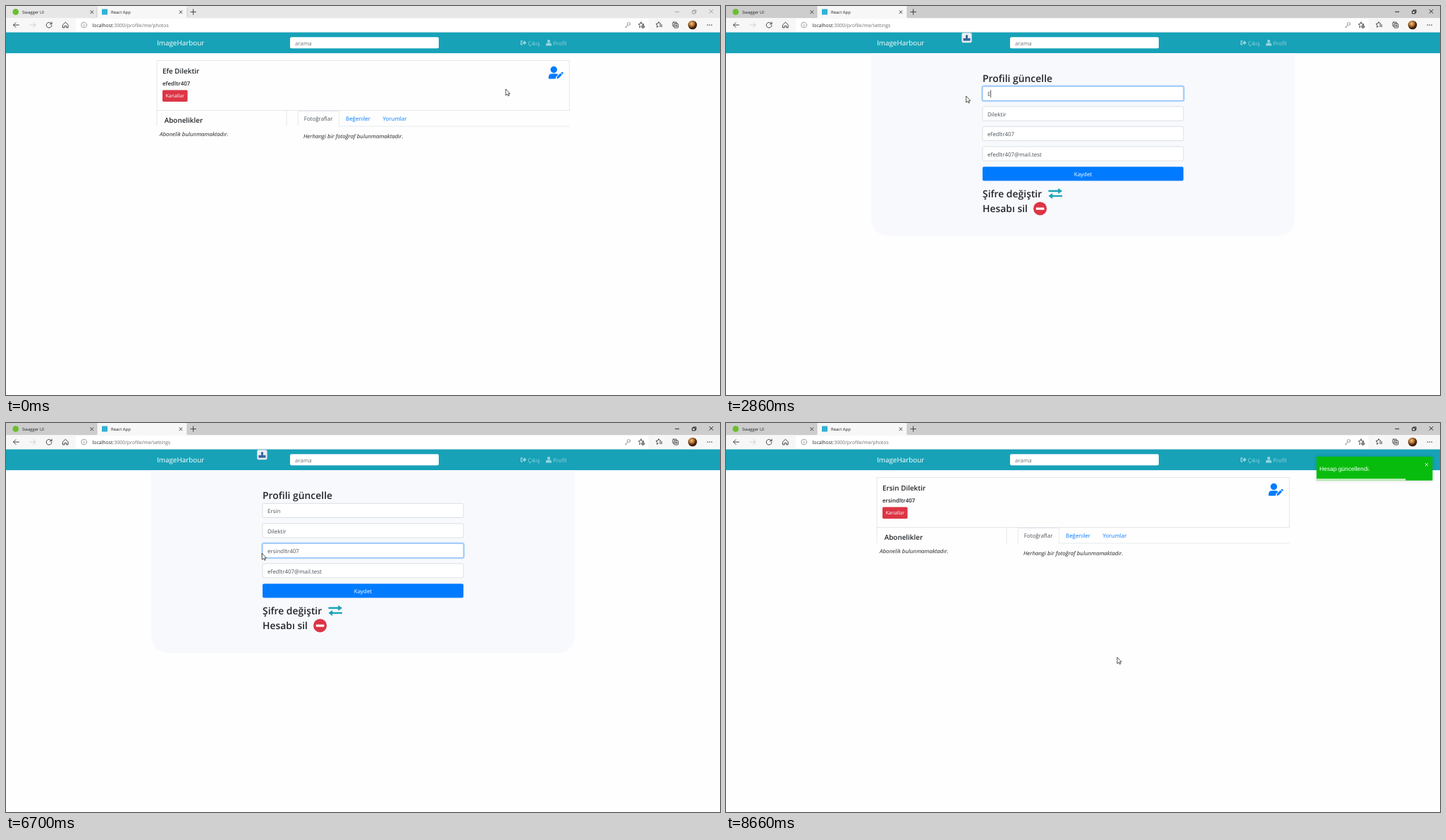
Recreate the animation shown at these times as an HTML page. Size 1013x553 px, loop 8.7 s.

```html
<!DOCTYPE html>
<html lang="tr">
<head>
<meta charset="utf-8">
<title>Profile update</title>
<style>
  html, body { margin: 0; width: 100%; height: 100%; overflow: hidden; background: #fefefe; }
  svg { display: block; width: 100%; height: 100%; }
  text { font: 7.93px "Open Sans", "Noto Sans", sans-serif; fill: #212529; text-rendering: geometricPrecision; white-space: pre; }
  .tiny { font-size: 5.95px; }
  .small { font-size: 6.95px; }
  .title { font-size: 9.9px; font-weight: 600; }
  .head { font-size: 13.9px; font-weight: 600; }
  .semi { font-weight: 600; }
  .it { font-style: italic; }
  .mid { text-anchor: middle; }
  .white { fill: #fff; }
  .blue { fill: #007bff; }
  .grey { fill: #495057; }
  .pale { fill: #fff; opacity: .55; }
  .line { fill: none; stroke: #dee2e6; stroke-width: .8; }
  .ico { fill: none; stroke: #333; stroke-width: .9; stroke-linecap: round; stroke-linejoin: round; }
  .cur { fill: #fff; stroke: #111; stroke-width: .7; stroke-linejoin: round; }
</style>
</head>
<body>
<svg viewBox="0 0 1013 553" preserveAspectRatio="none">
  <defs>
    <radialGradient id="photo" cx=".4" cy=".35">
      <stop offset="0" stop-color="#f3c58c"/><stop offset=".55" stop-color="#b8702c"/><stop offset="1" stop-color="#40200f"/>
    </radialGradient>
    <g id="person"><circle cx="4" cy="2.1" r="2.1"/><path d="M0 8.4V7q0-2.4 2.4-2.4h3.2Q8 4.6 8 7v1.4z"/></g>
  </defs>
  <rect width="1013" height="553" fill="#fefefe"/>

  <!-- browser window -->
  <rect id="strip" width="1013" height="17.2"/>
  <path d="M129 18V2q0-2 2-2h124q2 0 2 2v16z" fill="#f7f7f7"/>
  <path d="M129 2v14M257 2v14" stroke="#b9b9b9" stroke-width=".7"/>
  <rect y="17" width="1013" height="20.6" fill="#f7f7f7"/>
  <rect x="99" y="18.3" width="812.5" height="17.6" rx="2" fill="#fff"/>
  <circle cx="13.7" cy="8.4" r="4.3" fill="#6bbf2a"/>
  <rect x="136" y="4.4" width="8" height="8" fill="#31b3d4"/>
  <text class="tiny" x="23" y="10.7">Swagger UI</text>
  <text class="tiny" x="149" y="10.7">React App</text>
  <g class="ico">
    <path d="M119.8 6.6l4 4m0-4l-4 4M246 6.6l4 4m0-4l-4 4M262 8.4h7.4m-3.7-3.7v7.4"/>
    <path d="M18.5 27h-8m3.4-3.4L10.500 27l3.400 3.400"/>
    <path d="M34 27h8m-3.4-3.400L42 27l-3.400 3.400" stroke="#c9c9c9"/>
    <path d="M64.500 25.200a3.900 3.900 0 1 0 .500 2.300M65 23v2.700h-2.700"/>
    <path d="M80.700 26.600l3.700-3.400 3.700 3.400v4.200h-2.400v-2.600h-2.600v2.600h-2.400z"/>
    <g stroke="#777" stroke-width=".7">
      <circle cx="110.600" cy="27" r="3.900"/><path d="M110.600 26.500v2.600m0-4.200v.100"/>
      <circle cx="883.500" cy="25.500" r="2.100"/><path d="M882 27l-3.400 3.400h1.500v-1.200"/>
    </g>
    <path d="M901 23l1.200 2.500 2.800.400-1.600 1.500M899.800 30l-1 .600.500-2.800-2-2 2.600-.400L901 23"/>
    <circle cx="903.600" cy="29.400" r="2"/><path d="M902.700 29.400h1.800m-.900-.900v1.800" stroke-width=".6"/>
    <path d="M929 25l-1.700-.200L926 22.500l-1.300 2.500-2.700.400 2 1.900-.500 2.900 1.800-1M927.500 27h3.300m-3.300 2h3.300"/>
    <rect x="946" y="23" width="5.600" height="6" rx="1"/><rect x="948" y="25" width="5.700" height="6" rx="1" fill="#f7f7f7"/><path d="M949.500 28h2.800m-1.400-1.400v2.800"/>
  </g>
  <circle cx="974" cy="27" r="6.300" fill="url(#photo)"/>
  <g fill="#333"><circle cx="995.400" cy="27" r=".8"/><circle cx="998.300" cy="27" r=".8"/><circle cx="1001.200" cy="27" r=".8"/></g>
  <path id="controls" class="ico" stroke-width=".7" d="M949.700 8.300h5M974 7h3.800v3.800H974zM975.200 7V5.800h3.800v3.800h-1.200M998 5.200l5 5m0-5l-5 5"/>
  <text class="small" x="122.500" y="29.900">localhost<tspan fill="#6d6d6d">:3000/profile/me/</tspan><tspan id="route" fill="#6d6d6d"></tspan></text>

  <!-- site header -->
  <rect y="37.500" width="1013" height="29.600" fill="#17a2b8"/>
  <text class="white" x="214" y="56.300" style="font-size:9.900px">ImageHarbour</text>
  <rect x="403" y="44.300" width="211" height="16" rx="2" fill="#fff"/>
  <text x="410" y="55.700" style="fill:#6c757d">arama</text>
  <g class="pale">
    <path d="M733 49h-1.800q-1.200 0-1.200 1.200v4q0 1.200 1.200 1.200h1.800v-1.300h-1.600v-3.800h1.600zM733 51h2v-2.200l3.400 3.400-3.400 3.400v-2.200h-2z"/>
    <use href="#person" x="766" y="48"/>
  </g>
  <text class="pale" x="740.600" y="55.500">Çıkış</text>
  <text class="pale" x="776" y="55.500">Profil</text>

  <g id="profile">
    <rect class="line" x="214" y="77.400" width="585.300" height="71.200"/>
    <text class="title" id="fullName" x="222" y="96.400"></text>
    <text class="semi" id="userName" x="222" y="113.400"></text>
    <rect x="222" y="119.500" width="35.600" height="16.400" rx="1.700" fill="#dc3545"/>
    <text class="small white mid" x="239.800" y="130.400">Kanallar</text>
    <g class="blue">
      <circle cx="777.200" cy="90.500" r="4.700"/>
      <path d="M769.800 103.500v-2.300q0-5 5-5h5q2.300 0 3.700 1.300l-3.300 3.200-.500 2.800zM781.200 103.300l.500-2.700 5-5 2.200 2.200-5 5zM787.300 94.900l.9-.9q.7-.6 1.300 0l1 1q.6.600 0 1.200l-.9.900z"/>
    </g>
    <path class="line" d="M214 148.500V171M398.200 148.500V171M414.300 171v-20q0-1.700 1.700-1.700h55q1.700 0 1.700 1.700v20H799.500"/>
    <text class="title" x="224.700" y="165.600">Abonelikler</text>
    <text class="it" x="218" y="184.700">Abonelik bulunmamaktadır.</text>
    <text class="grey" x="422.800" y="163">Fotoğraflar</text>
    <text class="blue" x="482" y="163">Beğeniler</text>
    <text class="blue" x="534.500" y="163">Yorumlar</text>
    <text class="it" x="422" y="187.800">Herhangi bir fotoğraf bulunmamaktadır.</text>
  </g>

  <g id="settings">
    <path d="M206.300 67.100h600.700V300.500q0 26.400-26.400 26.400H232.700q-26.400 0-26.400-26.400z" fill="#f8f9fc"/>
    <text class="head" x="364" y="107.500">Profili güncelle</text>
    <g id="fields"></g>
    <rect id="saveRing" x="363.200" y="227.700" width="286.600" height="21.700" rx="2.800" fill="none" stroke="#007bff" stroke-opacity=".5" stroke-width="1.700"/>
    <rect id="save" x="364" y="228.500" width="285" height="20.100" rx="2"/>
    <text class="white mid" x="506.500" y="241.600">Kaydet</text>
    <text class="head" x="364" y="271.700">Şifre değiştir</text>
    <text class="head" x="364" y="293.200">Hesabı sil</text>
    <path fill="#17a2b8" d="M457.500 261.800h13.800v-2.900l5.700 4.100-5.700 4.100v-2.900h-13.800zM477 268.900h-13.800V266l-5.700 4.100 5.700 4.100v-2.900H477z"/>
    <circle cx="445.600" cy="288" r="9.500" fill="#dc3545"/>
    <rect x="439.800" y="286.400" width="11.600" height="3.300" rx=".6" fill="#fff"/>
  </g>

  <g id="badge">
    <rect y="38.300" width="14" height="13.700" rx="2" fill="#eceff2" stroke="#c9d3da" stroke-width=".5"/>
    <path d="M2 49.500v-3.800h3.600V44q-.8-3 1.400-3t1.400 3v1.700H12v3.800z" fill="#34679f"/>
  </g>

  <g id="status">
    <path d="M0 543.500h102q2 0 2 2V553H0z" fill="#f7f7f7"/>
    <text class="tiny" x="2.700" y="550.800" fill-opacity=".7">localhost:3000/profile/me/settings</text>
  </g>

  <g id="toast" style="filter:drop-shadow(0 .5px 2.500px rgba(0,0,0,.15))">
    <rect x="837.800" y="47.700" width="164.600" height="34" rx=".5" fill="#07bc0c"/>
    <text class="white" x="842" y="67.500" style="font:8.440px 'Liberation Sans',Arial,sans-serif">Hesap güncellendi.</text>
    <path d="M991.900 57l4.200 4.200m0-4.200l-4.200 4.200" stroke="#d5f3d6" stroke-width="1"/>
    <rect id="progress" x="837.800" y="79.100" height="2.600" fill="#fff" fill-opacity=".75"/>
  </g>

  <g id="cursor">
    <path id="arrow" class="cur" d="M0 0V9.200L2.100 7.200 3.500 10 4.900 9.400 3.600 6.700H6.200Z"/>
    <path id="beam" d="M-2-5h1.500l.5.500.5-.5H2M0-4.500v9M-2 5h1.500l.5-.5.5.500H2" fill="none" stroke="#222" stroke-width=".9"/>
    <path id="hand" class="cur" d="M-1 1.200a1 1 0 0 1 2 0V4.800l4.200.9q1.400.4 1.200 1.800l-.9 4.900h-4.900l-3.300-4.500q-.5-1.200.8-1.200l.9.800z"/>
  </g>
</svg>
<script>
const $ = id => document.getElementById(id);
const LOOP = 8700, PX = 1013 / 1920;
const SETTINGS = 430, SAVED = 7950, TOAST = 7965, PRESS = 7760;
const SURNAME = "Dilektir";
const TAIL = "dltr407";

// [time, x, y] of the pointer
const PATH = [
  [30, 709, 118], [130, 738, 106], [240, 770, 95], [600, 770, 95], [700, 685.5, 124],
  [850, 555, 138], [1050, 442, 132], [1250, 395, 126], [1430, 383, 125],
  [1760, 383, 125], [1860, 362, 126], [1960, 340.7, 128],
  [4400, 340.7, 128], [4520, 362, 155], [4640, 390, 180], [4760, 400, 184],
  [4900, 400, 184], [5010, 381, 184], [5100, 380, 184], [5160, 363, 185],
  [6700, 363, 185], [6860, 400, 212], [7020, 452, 236], [7140, 486, 247], [7260, 499, 240.5],
  [8060, 499, 240.5], [8200, 512, 268], [8400, 541, 316], [8630, 555, 333]
];
const FIRST = [[0, "Efe"], [2860, "E"], [3130, "Er"], [3400, "Ers"], [3500, "Ersi"], [3900, "Ersin"]];
const NICK = [[0, "efe"], [5760, "e"], [6060, "er"], [6150, "ers"], [6240, "ersi"], [6340, "ersin"]];

const between = (t, a, b) => t >= a && t < b;
const ramp = (t, a, len = 150) => Math.min(1, Math.max(0, (t - a) / len));
const ease = u => u * u * (3 - 2 * u);
const latest = (steps, t) => steps.filter(s => s[0] <= t).pop()[1];
const show = (el, on) => el.style.display = on ? "" : "none";

function track(points, t, curve = u => u) {
  if (t <= points[0][0]) return points[0].slice(1);
  for (let i = 1; i < points.length; i++) {
    const [a, b] = [points[i - 1], points[i]];
    if (t < b[0]) {
      const u = curve((t - a[0]) / (b[0] - a[0]));
      return a.slice(1).map((v, k) => v + (b[k + 1] - v) * u);
    }
  }
  return points[points.length - 1].slice(1);
}

const tops = [114.4, 142.9, 171.4, 199.9];
$("fields").innerHTML = tops.map(y => `<g>
  <rect x="364" y="${y}" width="285" height="20.100" rx="2" fill="#fff" stroke="#ced4da" stroke-width=".7"/>
  <g class="ring" fill="none">
    <rect x="363" y="${y - 1}" width="287" height="22.100" rx="3" stroke="#007bff" stroke-opacity=".27" stroke-width="1.700"/>
    <rect x="364" y="${y}" width="285" height="20.100" rx="2" stroke="#80bdff" stroke-width=".7"/>
  </g>
  <rect class="sel" y="${y + 4.4}" height="12" fill="#0078d7"/>
  <text class="grey" x="371" y="${y + 13.6}"></text>
  <rect class="bar" y="${y + 4.9}" width=".7" height="11" fill="#222"/>
</g>`).join("");
const fields = [...$("fields").children].map(g => ({
  text: g.querySelector("text"), ring: g.querySelector(".ring"),
  sel: g.querySelector(".sel"), bar: g.querySelector(".bar")
}));

function drawField(f, value, focus, caretAt = -1, selEnd = 0, pointerX = 0) {
  f.text.textContent = value;
  f.ring.style.opacity = focus;
  const edge = n => 371 + (n ? f.text.getSubStringLength(0, n) : 0);
  show(f.bar, caretAt >= 0);
  if (caretAt >= 0) f.bar.setAttribute("x", edge(caretAt));
  let from = 0;
  while (from < selEnd && (edge(from) + edge(from + 1)) / 2 < pointerX) from++;
  show(f.sel, from < selEnd);
  if (from < selEnd) {
    f.sel.setAttribute("x", edge(from));
    f.sel.setAttribute("width", edge(selEnd) - edge(from));
    f.text.innerHTML = value.slice(0, from) +
      `<tspan fill="#fff">${value.slice(from, selEnd)}</tspan>` + value.slice(selEnd);
  }
}

function drawForm(t, x) {
  const first = latest(FIRST, t), nick = latest(NICK, t);
  const firstCaret = between(t, 2860, 3730) || between(t, 3900, 4160) || between(t, 4690, 5030);
  const nickCaret = between(t, 5760, 6430) || between(t, 6960, 7530);
  const firstFocus = ease(ramp(t, 1770)) - ease(ramp(t, 5030));
  const nickFocus = ease(ramp(t, 5030)) - ease(ramp(t, PRESS));
  drawField(fields[0], first, firstFocus, firstCaret ? first.length : -1, between(t, 1760, 2860) ? 3 : 0, x);
  drawField(fields[1], SURNAME, 0);
  drawField(fields[2], nick + TAIL, nickFocus, nickCaret ? nick.length : -1, between(t, 5040, 5760) ? 3 : 0, x);
  drawField(fields[3], "efe" + TAIL + "@mail.test", 0);

  const [g, b] = track([[7000, 123, 255], [7150, 105, 217], [PRESS, 105, 217], [PRESS + 100, 97, 206]], t);
  $("save").setAttribute("fill", `rgb(0,${g},${b})`);
  $("saveRing").style.opacity = ease(ramp(t, PRESS));
}

function drawToast(t) {
  const age = t - TOAST;
  show($("toast"), age >= 0);
  const [dx] = track([[0, 3000], [420, -25], [525, 10], [630, -5], [700, 0]], age, u => 1 - (1 - u) ** 3);
  $("toast").setAttribute("transform", `translate(${dx * PX} 0)`);
  $("toast").style.opacity = ramp(age, 0, 300);
  $("progress").setAttribute("width", 164.6 * (1 - Math.max(0, age) / 3000));
}

function drawPointer(t, x, y, onForm) {
  const inX = x >= 364 && x <= 649;
  const overField = onForm && t >= 600 && inX && tops.some(top => y >= top && y <= top + 20);
  const overButton = onForm && inX && y >= 228.5 && y <= 248.6;
  const waiting = between(t, 225, 600) || between(t, SAVED, 8060);
  const kind = overField ? "beam" : overButton || waiting ? "hand" : "arrow";
  for (const id of ["arrow", "beam", "hand"]) show($(id), id === kind);
  $("cursor").setAttribute("transform", `translate(${x} ${y})`);
}

function draw(t) {
  const onForm = between(t, SETTINGS, SAVED), saved = t >= SAVED, active = t >= 370;
  const [x, y] = track(PATH, t);
  $("strip").setAttribute("fill", active ? "#cdcdcd" : "#e7e7e7");
  $("controls").style.stroke = active ? "#111" : "#999";
  $("route").textContent = onForm ? "settings" : "photos";
  show($("settings"), onForm);
  show($("profile"), !onForm);
  $("fullName").textContent = (saved ? "Ersin " : "Efe ") + SURNAME;
  $("userName").textContent = (saved ? "ersin" : "efe") + TAIL;
  if (onForm) drawForm(t, x);

  show($("badge"), between(t, 1900, SAVED));
  $("badge").setAttribute("transform", `translate(${t < 5300 ? 334.6 : 356.4} 0)`);
  $("status").style.opacity = t < 260 ? 0 : 1 - ramp(t, 620, 125);
  drawToast(t);
  drawPointer(t, x, y, onForm);
}

const start = performance.now();
function tick() {
  draw((performance.now() - start) % LOOP);
  requestAnimationFrame(tick);
}
tick();
</script>
</body>
</html>
```
